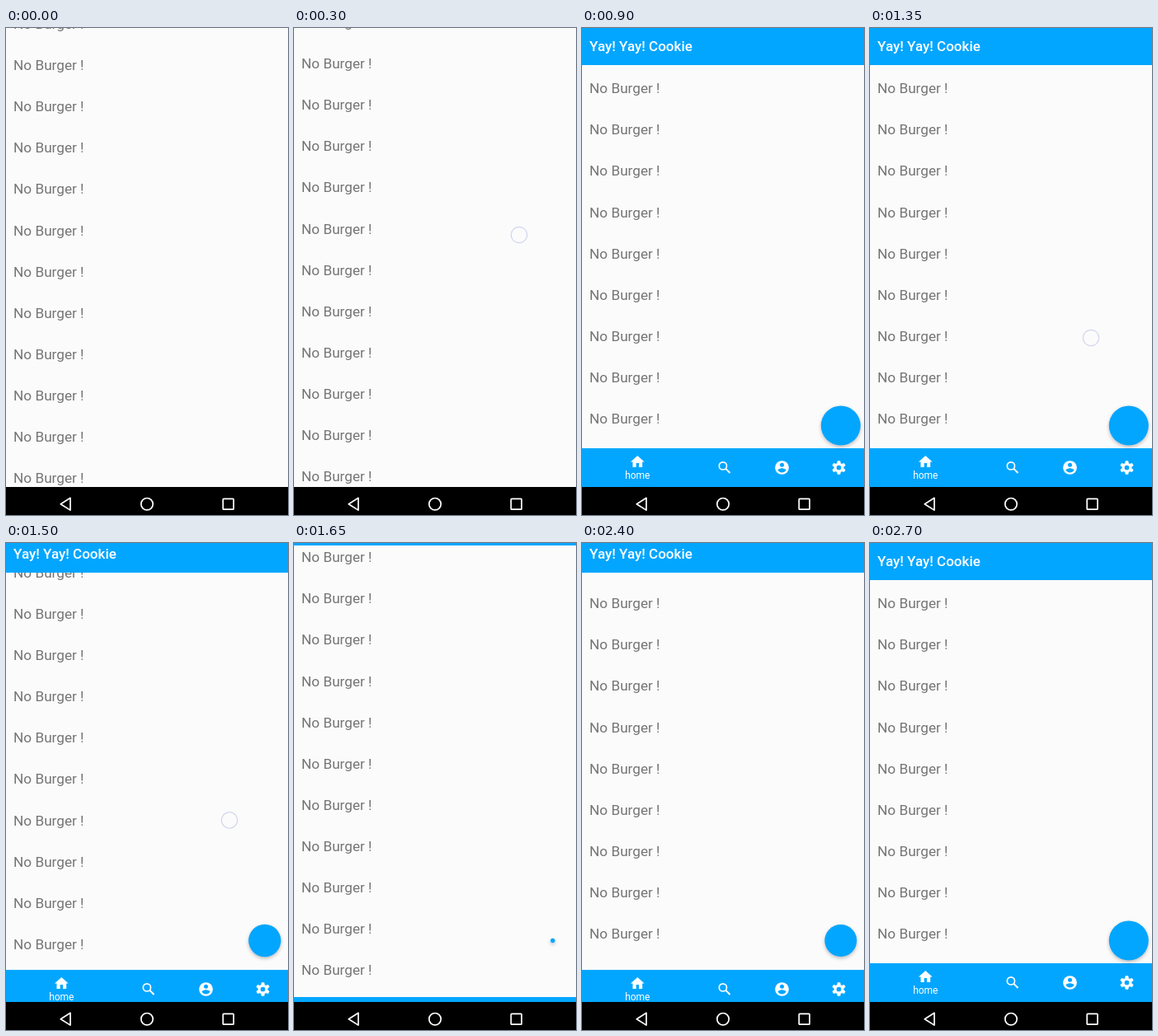
These frames come from a looping animation (342x591 px, 3300 ms). An HTML page:

```html
<!DOCTYPE html>
<html lang="en">
<head>
<meta charset="utf-8">
<title>Scrolling list with hiding bars</title>
<style>
  html, body { margin: 0; width: 100%; height: 100%; overflow: hidden; background: #fbfbfb; }
  svg { display: block; width: 342px; height: 591px; font-family: Roboto, sans-serif; }
  .row { font-size: 17.2px; fill: #757575; }
  .bar { fill: #03a6ff; }
  .title { font-size: 17px; font-weight: 500; fill: #fff; }
  .icon, .label { fill: #fff; }
  .label { font-size: 12px; text-anchor: middle; }
  .fab { fill: #03a6ff; filter: drop-shadow(0 2px 2px rgba(0, 0, 0, .25)); }
  .touch { fill: none; stroke: #d3d6f0; stroke-width: 1.3; }
  .nav { fill: none; stroke: #fff; stroke-width: 1.7; stroke-linejoin: round; }
</style>
</head>
<body>
<svg viewBox="0 0 342 591">
  <g id="list"></g>
  <circle id="touch" class="touch" r="9.7"/>
  <g id="top">
    <rect class="bar" y="-5" width="342" height="50"/>
    <text class="title" x="9.1" y="28">Yay! Yay! Cookie</text>
  </g>
  <g id="bottom">
    <rect class="bar" y="510" width="342" height="50"/>
    <path class="icon" transform="translate(57.3 516.4) scale(.835)" d="M10 20v-6h4v6h5v-8h3L12 3 2 12h3v8z"/>
    <text class="label" x="67.3" y="547">home</text>
    <g transform="translate(173 533.5) scale(.835)" fill="none" stroke="#fff" stroke-width="2">
      <circle cx="-2.5" cy="-2.5" r="5.5"/>
      <path d="M1.6 1.6 7.8 7.8" stroke-width="2.4"/>
    </g>
    <g transform="translate(242.5 533.5) scale(.835)">
      <circle class="icon" r="10"/>
      <circle class="bar" cy="-4" r="3"/>
      <path class="bar" d="M-6 4C-6 2-2 .9 0 .9S6 2 6 4A7.2 7.2 0 0 1-6 4z"/>
    </g>
    <g id="gear" transform="translate(311.5 533.5) scale(.835)">
      <circle r="5.2" fill="none" stroke="#fff" stroke-width="3.6"/>
    </g>
  </g>
  <circle id="fab" class="fab" cx="313.8" cy="482.5"/>
  <rect y="557" width="342" height="34"/>
  <g class="nav">
    <path d="M78 570.3v14.8L66.3 577.7z"/>
    <circle cx="171" cy="577.7" r="7.2"/>
    <rect x="263.2" y="571.4" width="12.8" height="12.8" rx=".8"/>
  </g>
</svg>
<script>
const LOOP = 3300, TICK = 150, ROW = 50.12, HIDE = 47, FAB = 24, BAR_MS = 288;

// A swipe starts at (x, y), scrolls the list and sets the bars moving shortly after.
const swipes = [
  { down: 300, up: 750, ms: 390, dist: 130.4, x: 273, y: 251, bars: 456 },
  { down: 1350, up: 1650, ms: 445, dist: -141.4, x: 268, y: 376, bars: 1422 },
  { down: 2100, up: 2400, ms: 300, dist: 141.4, x: 269.5, y: 304, bars: 2192 }
];

const $ = id => document.getElementById(id);
const add = (parent, tag, attrs) => {
  const el = document.createElementNS("http://www.w3.org/2000/svg", tag);
  for (const key in attrs) el.setAttribute(key, attrs[key]);
  return parent.appendChild(el);
};
const shift = (id, x, y) => $(id).setAttribute("transform", `translate(${x} ${y})`);

// Smooth 0 to 1 over the given span
const ramp = (time, from, ms) => {
  const x = Math.min(1, Math.max(0, (time - from) / ms));
  return x * x * (3 - 2 * x);
};

for (let i = 0; i < 13; i++) {
  add($("list"), "text", { class: "row", x: 9.1, y: i * ROW + 6.1 }).textContent = "No Burger !";
}
for (let a = 0; a < 360; a += 60) {
  add($("gear"), "path", { class: "icon", d: "M-2.9-6 -2-10H2L2.9-6z", transform: `rotate(${a})` });
}

function draw(time) {
  let scroll = 45 - 2 * ramp(time, 0, TICK);
  let shown = 0;
  let finger = null;
  for (const s of swipes) {
    const moved = s.dist * ramp(time, s.down, s.ms);
    scroll += moved;
    shown += Math.sign(s.dist) * ramp(time, s.bars, BAR_MS);
    if (time >= s.down && time < s.up) finger = [s.x - moved * .08, s.y + moved * 1.06];
  }
  const off = HIDE * (1 - shown);
  shift("list", 0, scroll % ROW - ROW);
  shift("top", 0, Math.floor(-off));
  shift("bottom", 0, Math.floor(off));
  $("fab").setAttribute("r", FAB * shown);
  $("touch").style.display = finger ? "" : "none";
  if (finger) shift("touch", ...finger);
}

const start = performance.now();
function tick() {
  const time = (performance.now() - start) % LOOP;
  draw(Math.floor(time / TICK) * TICK);
  requestAnimationFrame(tick);
}
tick();
</script>
</body>
</html>
```
